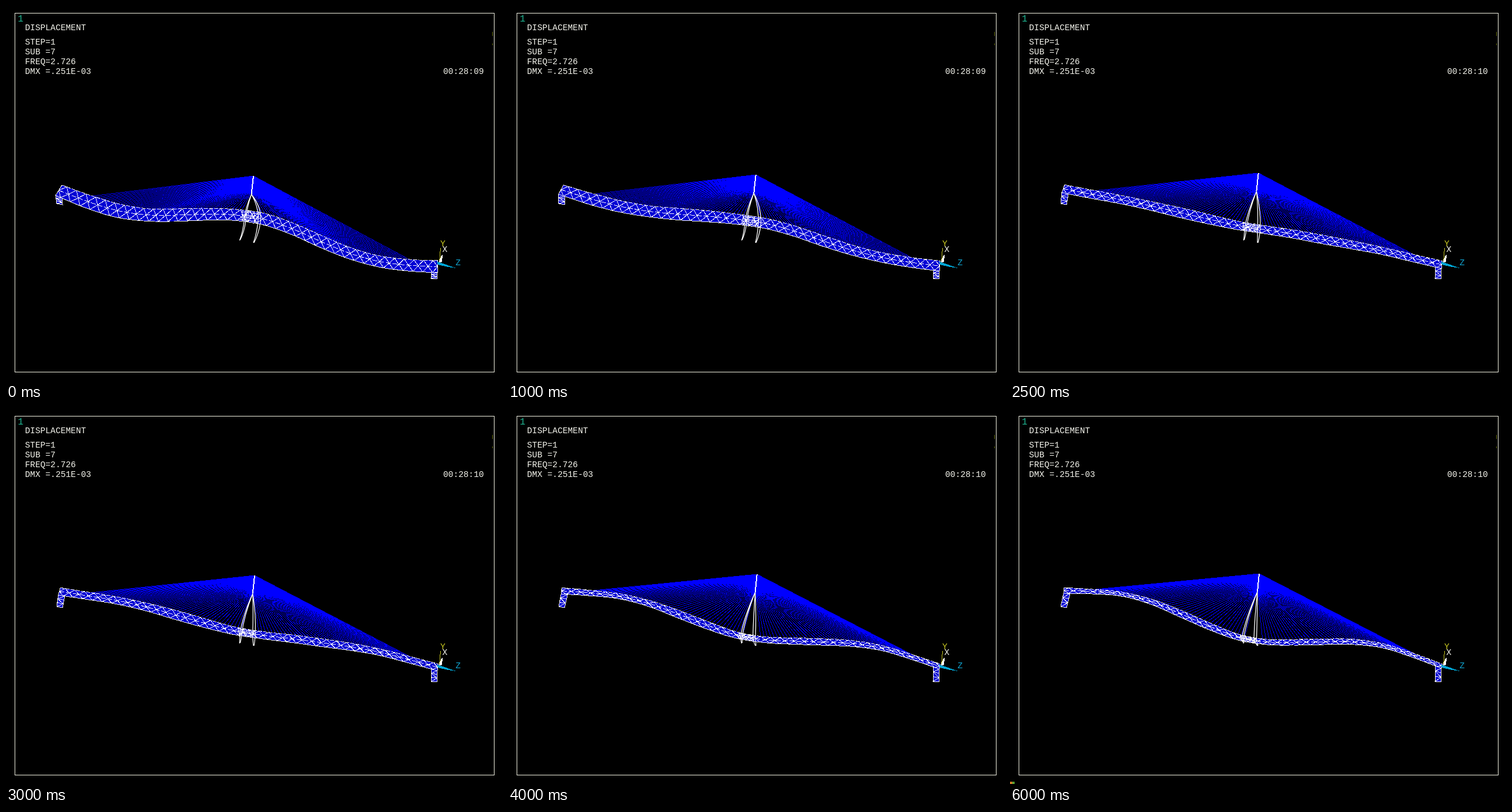
An HTML page that plays this animation: 860x651 px, repeating every 6.5 s.

```html
<!DOCTYPE html>
<html lang="en">
<head>
<meta charset="utf-8">
<title>Bridge mode shape</title>
<style>
html, body { margin: 0; width: 100%; height: 100%; overflow: hidden; background: #000; }
svg { display: block; width: 860px; height: 651px; }
text { font-family: "Liberation Mono", "Courier New", monospace; font-size: 14.7px; fill: #f4f4ec; white-space: pre; }
path, rect { fill: none; stroke: #fff; stroke-width: 1; shape-rendering: crispEdges; }
#cables { stroke: #00f; }
#deck, #piers { fill: #0000d4; }
#deck { stroke: none; }
#top { stroke-dasharray: 7 2; }
#mid { stroke-dasharray: 9 3; }
#mast { stroke-width: 2; }
#legs { stroke-width: 1.3; shape-rendering: auto; }
</style>
</head>
<body>
<svg viewBox="0 0 860 651">
  <rect width="860" height="651" style="fill:#000;stroke:none"/>
  <rect x="15.5" y="12.5" width="831" height="623" style="stroke:#f4f4e4"/>
  <text x="20.5" y="27" style="font-size:16px;fill:#1fb894">1</text>
  <text x="33" y="42">DISPLACEMENT</text>
  <text x="33" y="67">STEP=1</text>
  <text x="33" y="84">SUB =7</text>
  <text x="33" y="101">FREQ=2.726</text>
  <text x="33" y="118">DMX =.251E-03</text>
  <text x="758" y="118" id="clock"></text>
  <path d="M843.5 45V52M843.5 65V68" style="stroke:#6c7400"/>

  <path id="cables"/>
  <path id="deck"/>
  <path id="mesh"/>
  <path id="mid"/>
  <path id="top"/>
  <path id="edge"/>
  <path id="piers"/>
  <path id="hub"/>
  <path id="legs"/>
  <path id="mast"/>

  <path d="M751.5 446L753.5 420" style="stroke:#c8c820"/>
  <path d="M750 446L755 433L757 432L756 444Z" style="fill:#fff;stroke:none"/>
  <path d="M747 444L752 445L780 455L766 453L749 449Z" style="fill:#00a8d8;stroke:none"/>
  <text x="753" y="417" style="fill:#c8c820">Y</text>
  <text x="756.5" y="427">X</text>
  <text x="779.5" y="450" style="fill:#10a4d0">Z</text>
  <g id="corner">
    <rect y="647" width="4" height="4" style="fill:#d07828;stroke:none"/>
    <rect x="4" y="647" width="4" height="4" style="fill:#58a030;stroke:none"/>
  </g>
</svg>
<script>
const STEP = 500, LOOP = 6500, LAST = 9;
const $ = id => document.getElementById(id);
const lerp = (a, b, k) => a + (b - a) * k;
const mix = (a, b, k) => a.map((v, i) => lerp(v, b[i], k));

// Deck edges at both extremes: x range and evenly spaced heights.
const high = {
  top: { x: [97, 749], y: [311, 329, 344, 352, 352, 351, 353, 360, 377, 399, 420, 434, 440, 442] },
  low: { x: [86, 748], y: [329, 350, 366, 373, 374, 372, 372, 379, 396, 419, 439, 453, 460, 463] }
};
const sunk = {
  top: { x: [93, 750], y: [310, 313, 318, 330, 349, 371, 391, 400, 400, 399, 400, 408, 424, 443] },
  low: { x: [93, 748], y: [320, 321, 325, 339, 361, 383, 401, 409, 410, 409, 409, 415, 431, 450] }
};

// Catmull-Rom through evenly spaced values.
function spline(ys, u) {
  const n = ys.length - 1, i = Math.min(n - 1, Math.floor(u * n)), s = u * n - i;
  const b = ys[i], c = ys[i + 1];
  const a = i ? ys[i - 1] : 2 * b - c, d = i + 2 <= n ? ys[i + 2] : 2 * c - b;
  return b + s / 2 * (c - a + s * (2 * a - 5 * b + 4 * c - d + s * (3 * (b - c) + d - a)));
}
const onEdge = (e, u) => [lerp(...e.x, u), spline(e.y, u)];

const poly = pts => "M" + pts.map(p => p[0].toFixed(1) + " " + p[1].toFixed(1)).join("L");
const line = (a, b) => poly([a, b]);
const range = (n, f) => Array.from({ length: n + 1 }, (_, i) => f(i / n, i));

function pier(a, b, c, d, rows) {
  let s = poly([a, b, c, d]) + "Z";
  for (let i = 0; i < rows; i++) {
    const l = mix(a, d, i / rows), r = mix(b, c, i / rows);
    const l2 = mix(a, d, (i + 1) / rows), r2 = mix(b, c, (i + 1) / rows);
    s += line(i % 2 ? l : r, i % 2 ? r2 : l2) + line(l2, r2);
  }
  return s;
}

// Leg bends smoothly from fork to knee, then runs to its fixed foot.
function leg(fork, bend, knee, foot) {
  const ctrl = bend.map((v, i) => 2 * v - (fork[i] + knee[i]) / 2);
  const swing = [lerp(knee[0], foot[0], .3), lerp(knee[1], foot[1], .6)];
  return `M${fork}Q${ctrl} ${knee}Q${swing} ${foot}`;
}

function pose(k) {
  const blend = side => ({
    x: mix(high[side].x, sunk[side].x, k),
    y: mix(high[side].y, sunk[side].y, k)
  });
  const top = blend("top"), low = blend("low");
  const at = (u, v) => mix(onEdge(top, u), onEdge(low, u), v);
  const set = (id, d) => $(id).setAttribute("d", d);

  const upper = range(100, u => at(u, 0)), lower = range(100, u => at(u, 1));
  set("deck", poly([...upper, ...lower.slice().reverse()]) + "Z");
  set("top", poly(upper));
  set("mid", poly(range(100, u => at(u, .5))));
  set("edge", poly(lower) + line(at(0, 0), at(0, 1)) + line(at(1, 0), at(1, 1)));
  set("mesh",
    poly(range(78, (u, i) => at(u, i % 2 ? 0 : .5))) +
    poly(range(78, (u, i) => at(u, i % 2 ? 1 : .5))));

  const tip = mix([429, 295], [432, 286], k);
  const fork = mix([425.5, 327], [429, 317], k);
  const root = mix(tip, fork, .85);
  let cables = "";
  for (const [far, near] of [[.075, .478], [.93, .525]]) {
    range(44, s => { cables += line(mix(tip, root, s), at(lerp(far, near, s), .1)); });
  }
  set("cables", cables);

  set("piers",
    pier(at(0, 1), at(.017, 1), [98, 345], [88, 343], 3) +
    pier(at(.984, 1), at(1, 1), [747, 474], [737, 473], 3));

  const left = mix([413, 372], [402, 398], k), right = mix([437, 374], [423, 399], k);
  const shift = (p, dx) => [p[0] + dx, p[1]];
  const bendL = mix([417, 350], [412, 360], k), bendR = mix([435, 350], [425, 360], k);
  set("legs",
    leg(fork, bendL, left, [405, 407]) +
    leg(fork, shift(bendL, 2), shift(left, 3), [406, 406]) +
    leg(fork, bendR, right, [429, 411]) +
    leg(fork, shift(bendR, 3.5), shift(right, 4.5), [430, 411]));
  set("mast", line(tip, fork));

  // Dense bracing where the legs pass through the deck.
  const u0 = (left[0] - 3 - top.x[0]) / (top.x[1] - top.x[0]);
  const u1 = (right[0] + 4 - top.x[0]) / (top.x[1] - top.x[0]);
  const hub = (s, v) => at(lerp(u0, u1, s), v);
  let brace = poly(range(6, (s, i) => hub(s, i % 2)));
  for (const v of [.15, .38, .62, .85]) brace += line(hub(0, v), hub(1, v));
  set("hub", brace);
}

let shown = -1;
function draw(now) {
  const step = Math.floor(now % LOOP / STEP);
  if (step !== shown) {
    shown = step;
    pose(Math.min(step, LAST) / LAST);
    $("clock").textContent = step < 5 ? "00:28:09" : "00:28:10";
    $("corner").style.display = step > LAST ? "" : "none";
  }
}
const start = performance.now();
function tick() {
  draw(performance.now() - start);
  requestAnimationFrame(tick);
}
tick();
</script>
</body>
</html>
```
